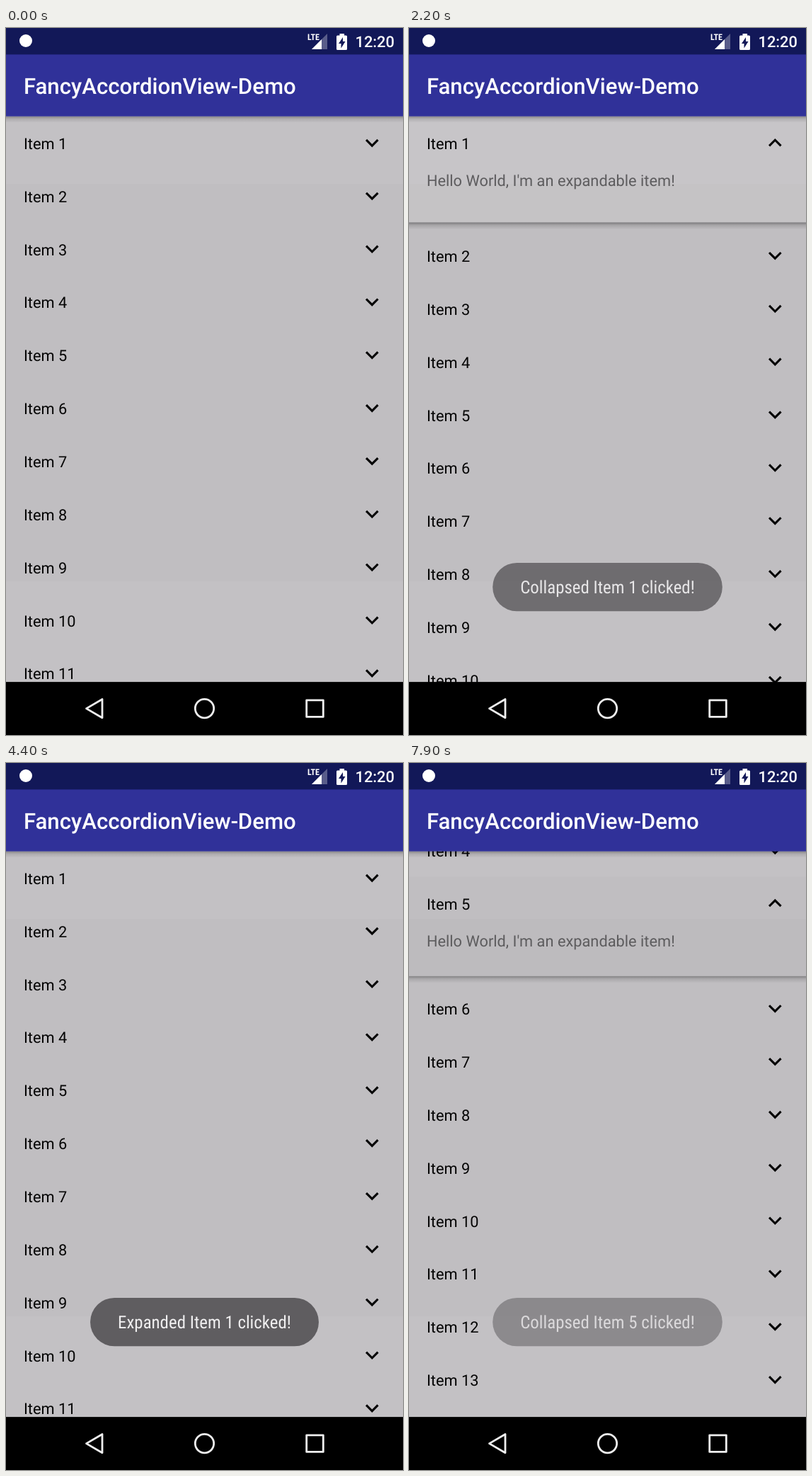
Write an HTML page that moves like this. It is 561 by 998 pixels and loops after 8 s.

```html
<!DOCTYPE html>
<html lang="en">
<head>
<meta charset="utf-8">
<title>FancyAccordionView-Demo</title>
<style>
  html, body { margin: 0; width: 100%; height: 100%; overflow: hidden; background: #000; }
  #stage {
    display: block; background: #c3c1c4;
    font: 21.8px Roboto, sans-serif; text-rendering: geometricPrecision;
  }
  .condensed { font-family: "Roboto Condensed", Roboto, sans-serif; font-stretch: 75%; }
</style>
</head>
<body>
<svg id="stage" width="561" height="998">
  <defs>
    <linearGradient id="shade" x2="0" y2="1">
      <stop stop-opacity=".36"/>
      <stop offset=".4" stop-opacity=".13"/>
      <stop offset="1" stop-opacity="0"/>
    </linearGradient>
  </defs>
  <rect y="220" width="561" height="561" fill="#c0bec1"/>
  <g id="list" fill="#050505"></g>

  <rect y="124.7" width="561" height="9" fill="url(#shade)" opacity=".85"/>
  <rect width="561" height="124.7" fill="#303199"/>
  <rect width="561" height="37.4" fill="#121858"/>
  <g fill="#fff">
    <text x="24.9" y="93.3" font-size="31.16" font-weight="500">FancyAccordionView-Demo</text>
    <text x="493.5" y="27.3" font-weight="500">12:20</text>
    <text class="condensed" x="426" y="17.3" font-size="12" font-weight="600">LTE</text>
    <circle cx="28" cy="18" r="9"/>
    <path d="M432 30L454 8V30Z" opacity=".3"/>
    <path d="M432 30L446 16V30Z"/>
    <path d="M471.5 10.5V8H478V10.5H480.5Q482 10.5 482 12V29.5Q482 31 480.5 31H468.5Q467 31 467 29.5V12Q467 10.5 468.5 10.5Z"/>
  </g>
  <path d="M476 13L470 22H473.5V28.5L479.5 19H476Z" fill="#121858"/>

  <g id="toast">
    <rect y="755" height="68.3" rx="34.1" fill="#5f5d60"/>
    <text class="condensed" x="280.5" y="798.3" font-size="24.9" text-anchor="middle" fill="#f0eff0"></text>
  </g>

  <rect y="923.1" width="561" height="75" fill="#000"/>
  <g fill="none" stroke="#eee" stroke-width="2.8" stroke-linejoin="round">
    <path d="M113.5 960.6L136 947.5V973.7Z"/>
    <circle cx="280.5" cy="960.6" r="13.2"/>
    <rect x="424.7" y="948.8" width="23.6" height="23.6"/>
  </g>
</svg>
<script>
const LOOP = 8000, STEP = 100;
const TOP = 124.75, ROW = 74.85, GAP = 9.36;

const taps = [
  { row: 0, y: 37, press: 50, release: 150, start: 200, duration: 260, opens: true, message: 'Collapsed Item 1 clicked!' },
  { row: 0, y: 30, press: 3750, release: 4050, start: 4050, duration: 300, opens: false, message: 'Expanded Item 1 clicked!' },
  { row: 4, y: 38, press: 7550, release: 7650, start: 7700, duration: 260, opens: true, message: 'Collapsed Item 5 clicked!' },
];

const ramp = (t, start, duration) => Math.min(1, Math.max(0, (t - start) / duration));
const easeInOut = x => (1 - Math.cos(Math.PI * x)) / 2;
const easeOut = x => 1 - (1 - x) ** 2;

function set(element, attributes) {
  for (const name in attributes) element.setAttribute(name, attributes[name]);
}

const list = document.getElementById('list');
const toast = document.getElementById('toast');
const [pill, caption] = toast.children;

// Each row is a nested svg, so its contents are clipped to its height.
list.innerHTML = Array.from({ length: 13 }, (_, i) => `
  <g>
    <rect class="shadow" width="561" height="10" fill="url(#shade)"/>
    <svg class="box" width="561">
      <rect class="card" width="561" height="100%" fill="#fff"/>
      <rect class="tint" width="561" height="100%"/>
      <circle class="ripple" cx="112"/>
      <text x="24.9" y="46.2">Item ${i + 1}</text>
      <text x="24.9" y="98.5" fill="#5d5c5e">Hello World, I'm an expandable item!</text>
      <path class="chevron" d="M4.59-3.41L0 1.17-4.59-3.41-6-2l6 6 6-6z"/>
    </svg>
  </g>`).join('');

const rows = [...list.children].map(group => {
  const parts = {};
  for (const part of group.querySelectorAll('[class]')) parts[part.getAttribute('class')] = part;
  return parts;
});

function drawRow(row, y, open) {
  const height = ROW * (1 + open);
  set(row.box, { y, height });
  set(row.shadow, { y: y + height, opacity: open });
  set(row.card, { opacity: 0.07 * open });
  const angle = -180 * Math.min(1, open * 1.15);
  set(row.chevron, { transform: `translate(517.3 ${ROW / 2}) rotate(${angle}) scale(1.558)` });
  set(row.tint, { opacity: 0 });
  set(row.ripple, { opacity: 0 });
}

function drawPress(t, { row, y, press, release }) {
  set(rows[row].tint, { opacity: 0.045 * ramp(t, press, 200) * (1 - ramp(t, release + 220, 125)) });
  set(rows[row].ripple, {
    cy: y,
    r: 17 * ramp(t, press, 50) + 330 * easeOut(ramp(t, release, 250)),
    opacity: 0.065 * (1 - ramp(t, release, 200)),
  });
}

function drawToast(t, { start, message }) {
  const shown = start + 92;
  caption.textContent = message;
  const width = caption.getComputedTextLength() + 78;
  set(pill, { x: 280.5 - width / 2, width });
  set(toast, { opacity: ramp(t, shown, 200) * (1 - ramp(t, shown + 1868, 245)) });
}

function draw(t) {
  const open = rows.map(() => 0);
  for (const tap of taps) {
    if (t < tap.start) continue;
    const progress = easeInOut(ramp(t, tap.start, tap.duration));
    open[tap.row] = tap.opens ? progress : 1 - progress;
  }

  const scroll = 4.52 * ROW * easeOut(ramp(t, 7750, 283));
  let y = TOP - scroll;
  rows.forEach((row, i) => {
    drawRow(row, y, open[i]);
    y += ROW + (ROW + GAP) * open[i];
  });

  const pressed = taps.filter(tap => t >= tap.press).pop();
  if (pressed) drawPress(t, pressed);
  drawToast(t, taps.filter(tap => t >= tap.start).pop() || taps[0]);
}

const origin = performance.now();
function tick() {
  const t = (performance.now() - origin) % LOOP;
  draw(Math.floor(t / STEP) * STEP);
  requestAnimationFrame(tick);
}
tick();
</script>
</body>
</html>
```
